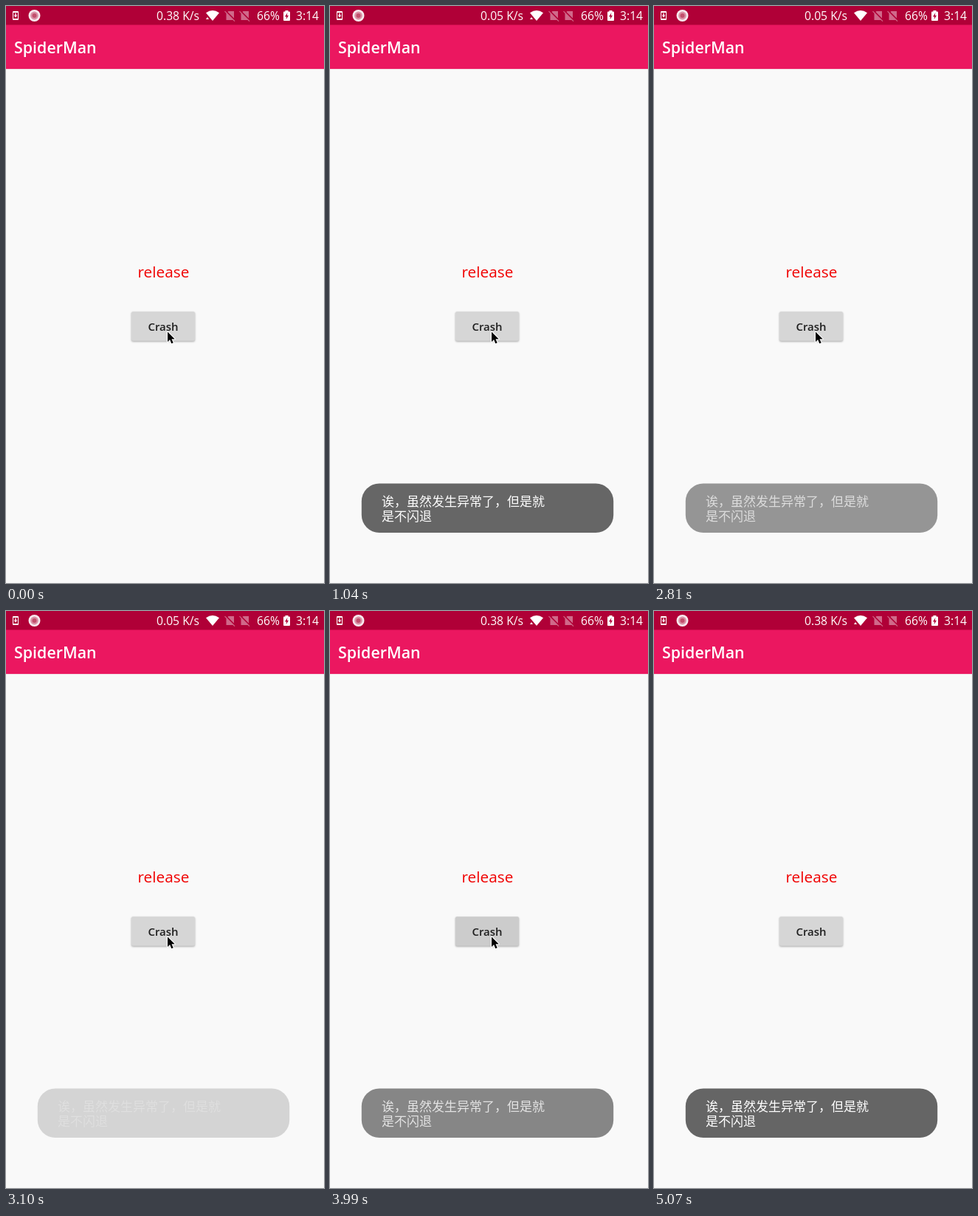
An HTML page with a canvas that plays this animation: 431 px wide and 780 px high, repeating every 5170 ms.

```html
<!DOCTYPE html>
<html lang="zh-CN">
<head>
<meta charset="utf-8">
<style>
html, body { margin: 0; width: 100%; height: 100%; overflow: hidden; background: #f9f9f9; }
canvas { display: block; }
</style>
</head>
<body>
<canvas id="stage" width="431" height="780"></canvas>
<script>
const ctx = document.getElementById('stage').getContext('2d');
const LOOP = 5170, STEP = 148;
const LATIN = '"Open Sans", "Noto Sans", sans-serif';
const CJK = '"Noto Sans CJK SC", "Noto Sans CJK", sans-serif';
const BAR = '#b00037';

const clamp = v => Math.max(0, Math.min(1, v));

function rect(x, y, w, h, color, r = 0) {
  ctx.fillStyle = color;
  ctx.beginPath();
  ctx.roundRect(x, y, w, h, r);
  ctx.fill();
}

function disc(x, y, r, color) {
  ctx.fillStyle = color;
  ctx.beginPath();
  ctx.arc(x, y, r, 0, Math.PI * 2);
  ctx.fill();
}

function poly(points, color) {
  ctx.fillStyle = color;
  ctx.beginPath();
  points.forEach(([x, y]) => ctx.lineTo(x, y));
  ctx.closePath();
  ctx.fill();
}

function text(str, x, y, font, color, align = 'left') {
  ctx.font = font;
  ctx.fillStyle = color;
  ctx.textAlign = align;
  ctx.fillText(str, x, y);
}

function simOff(x) {
  const tint = '#d0698a';
  poly([[x + 5, 7], [x + 12.5, 7], [x + 12.5, 19], [x + 2, 19], [x + 2, 10]], tint);
  ctx.lineCap = 'butt';
  for (const [dy, color, w] of [[-1, BAR, 2], [0.6, tint, 1.3]]) {
    ctx.strokeStyle = color;
    ctx.lineWidth = w;
    ctx.beginPath();
    ctx.moveTo(x, 6.5 + dy);
    ctx.lineTo(x + 13.5, 20 + dy);
    ctx.stroke();
  }
}

function statusBar(speed, upload) {
  const font = '15.7px ' + LATIN;
  rect(0, 0, 431, 25.5, BAR);

  rect(9, 7, 8, 12, '#fff', 1);
  rect(10, 9, 6, 8, BAR);
  rect(12.3, 9.7, 1.4, 3.5, '#fff');
  poly([[10.6, 12.6], [15.4, 12.6], [13, 15.6]], '#fff');

  disc(38.5, 13, 8, '#f7e9ee');
  disc(38.5, 13, 5.4, '#d992a6');
  disc(38.5, 13, 3, '#c24f6c');

  text(speed + ' K/s', 204, 19, font, '#fff');

  ctx.fillStyle = '#fff';
  ctx.beginPath();
  ctx.moveTo(280, 20);
  ctx.lineTo(271, 9.2);
  ctx.quadraticCurveTo(280, 3, 289, 9.2);
  ctx.closePath();
  ctx.fill();
  if (upload) poly([[271, 18], [273, 15], [275, 18]], '#fff');

  simOff(296.5);
  simOff(316.5);

  text('66%', 340, 19, font, '#fff');
  rect(376, 7.5, 9, 12.5, '#fff', 1);
  rect(378.5, 6, 4, 2, '#fff');
  poly([[381.4, 9], [378, 14.4], [380.2, 14.4], [379.6, 18.3], [383, 12.8], [380.8, 12.8]], BAR);
  text('3:14', 393, 19, font, '#fff');
}

// d: time relative to the tap's release
function button(d) {
  const rise = clamp((d + 60) / 120), fall = clamp((400 - d) / 250);
  const shade = Math.round(214 - 18 * Math.min(rise, fall));
  const lift = Math.min(clamp((d + 160) / 100), clamp((110 - d) / 90));
  ctx.save();
  ctx.shadowColor = `rgba(0,0,0,${0.33 - 0.03 * lift})`;
  ctx.shadowBlur = 2.5 + 3.5 * lift;
  ctx.shadowOffsetY = 1 + 2 * lift;
  rect(170, 413.3, 86, 39.4, `rgb(${shade},${shade},${shade})`, 2);
  ctx.restore();
  text('Crash', 213, 438.7, '600 15px ' + LATIN, '#1f1f1f', 'center');
}

function toast(alpha) {
  if (alpha <= 0) return;
  ctx.globalAlpha = alpha;
  rect(42.8, 645.5, 341.4, 66.5, '#656565', 24);
  const font = '300 17px ' + CJK;
  text('诶，虽然发生异常了，但是就', 70, 676.3, font, '#fff');
  text('是不闪退', 70, 696.3, font, '#fff');
  ctx.globalAlpha = 1;
}

function cursor(x, y) {
  ctx.save();
  ctx.translate(x, y);
  ctx.strokeStyle = '#fff';
  ctx.lineWidth = 2;
  ctx.lineJoin = 'round';
  ctx.beginPath();
  [[0, 0], [0, 13.5], [3.1, 10.6], [5.3, 15.8], [7.7, 14.8], [5.5, 9.7], [9.7, 9.7]]
    .forEach(([px, py]) => ctx.lineTo(px, py));
  ctx.closePath();
  ctx.stroke();
  ctx.fillStyle = '#000';
  ctx.fill();
  ctx.restore();
}

const fadeIn = d => 1 - (1 - clamp(d / 500)) ** 2;
const fadeOut = d => 1 - clamp(d / 500) ** 2;

function draw(time) {
  const t = Math.floor((time + 6) / STEP) * STEP;
  const second = t >= 3600;
  const d = t - (second ? 3737 : 580);
  const slow = t >= 700 && t < 3350;

  rect(0, 0, 431, 780, '#f9f9f9');
  rect(0, 25, 431, 60, '#eb1760');
  rect(0, 85, 431, 1, '#f3dce4');
  statusBar(slow ? '0.05' : '0.38', t < 1300 || t > 3350);
  text('SpiderMan', 11, 64, '600 21.4px ' + LATIN, '#fff');
  text('release', 213.4, 367, '20.8px ' + LATIN, '#f00000', 'center');
  button(d);
  toast(fadeIn(d) * (second ? 1 : fadeOut(t - 2527)));
  if (t < 4580) cursor(219, 440.5);
}

function tick() {
  draw(performance.now() % LOOP);
  requestAnimationFrame(tick);
}
tick();
</script>
</body>
</html>
```
